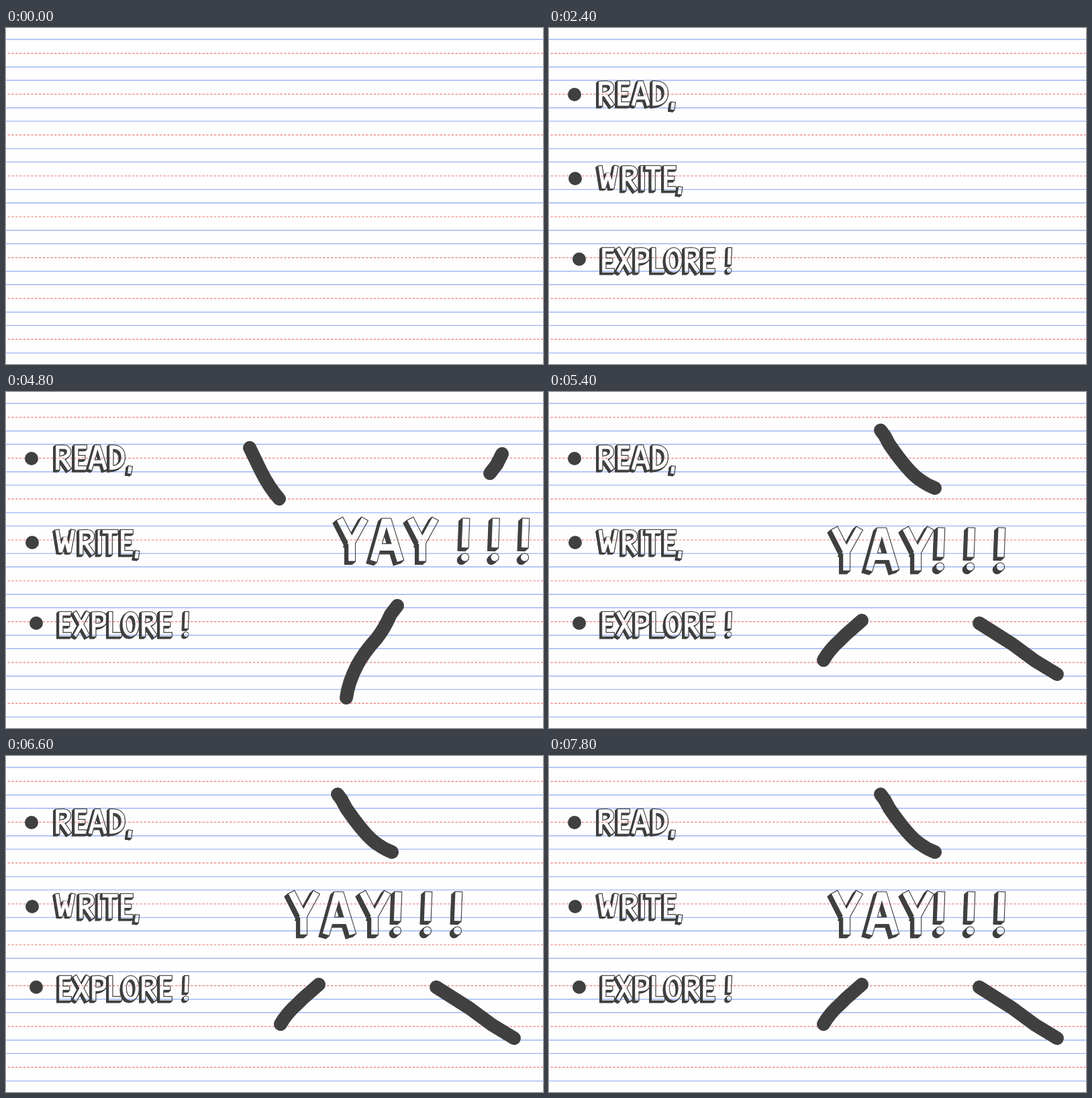
An HTML page with a canvas that plays this animation: 800 by 500 pixels, repeating every 8000 ms.

```html
<!DOCTYPE html>
<html lang="en">
<head>
<meta charset="utf-8">
<title>Read, write, explore!</title>
<style>
html, body { margin: 0; width: 100%; height: 100%; overflow: hidden; background: #fefefe; }
canvas { display: block; width: 800px; height: 500px; }
</style>
</head>
<body>
<canvas id="stage" width="800" height="500" role="img" aria-label="Read, Write, Explore! Yay!!!"></canvas>
<script>
const W = 800, H = 500, STEP = 600, LOOP = 8000;
const INK = '#404040';
const ctx = document.getElementById('stage').getContext('2d');

const layer = document.createElement('canvas');
layer.width = W;
layer.height = H;
const pen = layer.getContext('2d');

// Letter skeletons: cap height 100, left edge at 0, stroke weight 17.
const WEIGHT = 17;
const glyphs = {
  R: 'M10 91V10L30 9Q55 9 54 29Q53 46 22 53M28 55L53 91',
  E: 'M43 9H10V91H43M10 50H36',
  A: 'M9 91L32 9H41L66 91M18 67H57',
  D: 'M10 9V91Q57 88 56 46Q55 8 10 9Z',
  W: 'M9 9L22 89L40 32L55 89L70 9',
  I: 'M10 9V91',
  T: 'M9 9H55M32 9V91',
  X: 'M10 9L55 91M55 9L10 91',
  P: 'M10 91V10L28 9Q55 9 54 32Q53 56 18 55',
  L: 'M10 9V91H46',
  O: 'M34 9C0 9 0 91 34 91C67 91 67 9 34 9Z',
  Y: 'M10 9L34 56V91M60 9L34 56',
  '!': 'M11 9L9 60',
  ',': 'M10 92L8 106'
};
const outlines = Object.fromEntries(
  Object.entries(glyphs).map(([letter, d]) => [letter, new Path2D(d)]));
const dot = new Path2D('M0 90a8.5 8.5 0 1 0 17 0a8.5 8.5 0 1 0 -17 0Z');

function pass(letter, scale, x, y, grow) {
  pen.setTransform(scale, 0, 0, scale, x, y);
  pen.lineWidth = WEIGHT + grow / scale;
  pen.stroke(outlines[letter]);
  if (letter === '!') {
    pen.lineWidth = Math.max(0.1, grow / scale + 2);
    if (grow > 0) pen.stroke(dot);
    pen.fill(dot);
  }
}

// A hollow letter with a solid shadow swept down and to the left.
function drawLetter(letter, x, y, scale) {
  const dx = -8 * scale, dy = 7 * scale, sweeps = 12;
  pen.globalCompositeOperation = 'source-over';
  for (let i = sweeps; i >= 0; i--) {
    pass(letter, scale, x + dx * i / sweeps, y + dy * i / sweeps, 0.9);
  }
  pen.globalCompositeOperation = 'destination-out';
  pass(letter, scale, x, y, -1.3);
}

function drawWord(text, xs, y, scale) {
  pen.setTransform(1, 0, 0, 1, 0, 0);
  pen.clearRect(0, 0, W, H);
  pen.strokeStyle = pen.fillStyle = INK;
  pen.lineCap = 'square';
  pen.lineJoin = 'miter';
  pen.miterLimit = 3;
  [...text].forEach((letter, i) => drawLetter(letter, xs[i], y, scale));
  ctx.drawImage(layer, 0, 0);
}

function rule(y, color, dash) {
  ctx.strokeStyle = color;
  ctx.lineWidth = 1.4;
  ctx.setLineDash(dash);
  ctx.beginPath();
  ctx.moveTo(dash.length ? 2.5 : 0, y);
  ctx.lineTo(W, y);
  ctx.stroke();
}

function drawPaper() {
  ctx.fillStyle = '#fefefe';
  ctx.fillRect(0, 0, W, H);
  for (let i = 0; i < 8; i++) {
    const y = 17 + i * 60.8;
    rule(y, '#9db7f5', []);
    rule(y + 20.7, '#f58b8b', [3.4, 2.4]);
    rule(y + 41, '#9db7f5', []);
  }
  ctx.setLineDash([]);
}

function bullet(x, y) {
  ctx.fillStyle = INK;
  ctx.beginPath();
  ctx.arc(x, y, 10, 0, Math.PI * 2);
  ctx.fill();
}

const cheers = [
  {
    text: 'YAY!!!', xs: [421, 472, 527, 577, 622, 667], y: 201.5,
    marks: ['M494 57L500 65L507 78Q536 120 553 131Q564 139 575 143',
            'M409 399Q418 383 434 369L442 361L466 340',
            'M641 344L690 375L724 400L757 420']
  },
  {
    text: 'YAY!!!', xs: [493, 543, 598, 678, 722.5, 767], y: 187.5,
    marks: ['M363 83L380 118Q392 142 407 159',
            'M739 92L731 108L721 121',
            'M583 318L573 331Q564 352 552 367Q533 388 523 407Q510 432 507 455']
  }
];

function drawCheer({ text, xs, y, marks }) {
  drawWord(text, xs, y, 0.65);
  ctx.strokeStyle = INK;
  ctx.lineWidth = 20;
  ctx.lineCap = ctx.lineJoin = 'round';
  marks.forEach(d => ctx.stroke(new Path2D(d)));
  ctx.lineCap = 'butt';
}

function drawScene(step) {
  const small = 0.38;
  drawPaper();
  if (step >= 1) {
    bullet(38, 99);
    drawWord('READ,', [73, 101, 122.5, 153, 181], 78.5, small);
  }
  if (step >= 2) {
    bullet(39, 224);
    drawWord('WRITE,', [73, 108, 135.5, 143, 170, 191.5], 204.5, small);
  }
  if (step >= 3) {
    const shift = step === 3 ? 13 : 0;
    const lift = step === 3 ? 3 : 0;
    bullet(45, 344);
    drawWord('EXPLORE!', [78, 100, 127, 152, 173, 201, 228, 265].map(x => x + shift),
      326.5 - lift, small);
  }
  if (step >= 5) drawCheer(cheers[(step - 5) % 2]);
}

let shown = -1;
function tick(now) {
  const step = Math.floor((now % LOOP) / STEP);
  if (step !== shown) drawScene(shown = step);
  requestAnimationFrame(tick);
}
drawScene(shown = 0);
requestAnimationFrame(tick);
</script>
</body>
</html>
```
